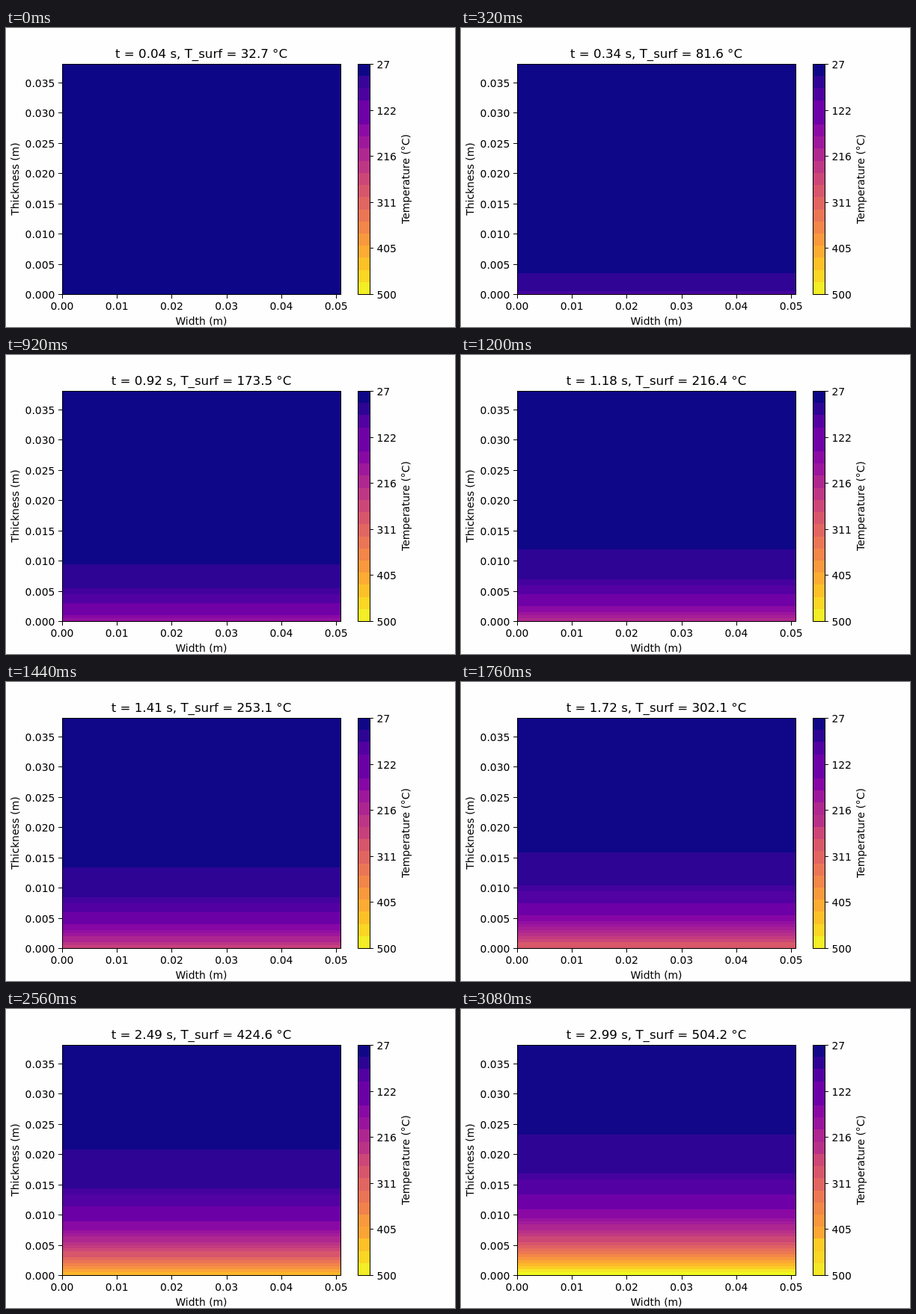
Animation, 600 px wide and 400 px high, one loop 3120 ms. Source, as an HTML page:

```html
<!DOCTYPE html>
<html>
<head>
<meta charset="utf-8">
<style>
  html, body { margin: 0; width: 100%; height: 100%; overflow: hidden; background: #fefefe; }
  svg { display: block; }
  text { font: 13.89px "DejaVu Sans", sans-serif; }
  #title { font-size: 16.67px; }
  rect, path { shape-rendering: crispEdges; }
  path { fill: none; stroke: #000; }
  .mid { text-anchor: middle; }
  .end { text-anchor: end; }
</style>
</head>
<body>
<svg id="stage" width="600" height="400" viewBox="0 0 600 400"></svg>
<script>
const FRAMES = 78, FRAME_MS = 40, STEPS = 13;
const ROWS = 77, BANDS = 19, T_MIN = 27, T_MAX = 500;
const DT = 0.002947, RISE = 0.47104, FOURIER = 0.4;
const LEFT = 75, TOP = 48, WIDTH = 372, HEIGHT = 308, BOTTOM = TOP + HEIGHT;
const BAR = 470, BAR_WIDTH = 16;

// Plasma colour map, one stop per 8 of 256 entries
const STOPS = ('0d0887 220690 310597 3f049c 4c02a1 5901a5 6600a7 7201a8 7e03a8 8a09a5 9511a1 ' +
  'a01a9c aa2395 b32c8e bc3587 c43e7f cc4778 d35171 da5a6a e06363 e66c5c eb7655 f0804e ' +
  'f58b47 f89540 fba139 fdac33 feb82c fdc527 fcd225 f8df25 f4ed27 effb20')
  .split(' ').map(hex => [0, 2, 4].map(k => parseInt(hex.slice(k, k + 2), 16)));

function plasma(fraction) {
  const i = Math.max(0, Math.min(255, Math.floor(fraction * 256)));
  const a = STOPS[i >> 3], b = STOPS[(i >> 3) + 1];
  return a.map((v, k) => Math.floor(v + (b[k] - v) * (i & 7) / 8));
}

// Merge colours that share a coarse RGB cell into their weighted mean
function reduceColors(samples) {
  const cells = {};
  const keyOf = ([r, g, b]) => [r >> 5, g >> 4, b >> 5].join();
  for (const { rgb, weight } of samples) {
    const cell = cells[keyOf(rgb)] ??= { sum: [0, 0, 0], weight: 0 };
    rgb.forEach((v, k) => cell.sum[k] += v * weight);
    cell.weight += weight;
  }
  return samples.map(({ rgb }) => {
    const { sum, weight } = cells[keyOf(rgb)];
    return `rgb(${sum.map(v => Math.floor(v / weight + 1e-6))})`;
  });
}

// Explicit 1D heat conduction with a linearly heated surface
function simulate() {
  const bar = Array.from({ length: BANDS }, (_, k) =>
    ({ rgb: plasma((k + 0.5) / BANDS), weight: BAR_WIDTH * HEIGHT / BANDS }));
  const frames = [];
  let temps = new Array(ROWS).fill(T_MIN);
  for (let step = 1; frames.length < FRAMES; step++) {
    temps = temps.map((v, i) => i
      ? v + FOURIER * (temps[i - 1] - 2 * v + (temps[i + 1] ?? v))
      : T_MIN + RISE * step);
    if (step % STEPS !== STEPS - 1) continue;
    const rows = temps.map(v =>
      ({ rgb: plasma((v - T_MIN) / (T_MAX - T_MIN)), weight: WIDTH * HEIGHT / ROWS }));
    frames.push({
      title: `t = ${(step * DT).toFixed(2)} s, T_surf = ${temps[0].toFixed(1)} °C`,
      colors: reduceColors([...rows, ...bar])
    });
  }
  return frames;
}

const stage = document.getElementById('stage');

function add(tag, attrs, content = '') {
  const el = document.createElementNS('http://www.w3.org/2000/svg', tag);
  for (const name in attrs) el.setAttribute(name, attrs[name]);
  el.textContent = content;
  return stage.appendChild(el);
}

const label = (x, y, content, cls = '') => add('text', { x, y, class: cls }, content);
const sideLabel = (x, content) =>
  add('text', { transform: `translate(${x} 202) rotate(-90)`, class: 'mid' }, content);

const fills = [];
const rowHeight = HEIGHT / ROWS;
for (let i = 0; i < ROWS; i++)
  fills.push(add('rect', { x: LEFT, y: BOTTOM - (i + 1) * rowHeight, width: WIDTH, height: rowHeight }));
for (let k = 0; k < BANDS; k++) {
  const edge = n => Math.round(TOP + n * HEIGHT / BANDS);
  fills.push(add('rect', { x: BAR, y: edge(k), width: BAR_WIDTH, height: edge(k + 1) - edge(k) }));
}

let lines = `M75.5 48.5H447.5V356.5H75.5ZM${BAR + 0.5} 48.5h16v308h-16Z`;
for (let k = 0; k < 6; k++) {
  const x = LEFT + k * 0.01 * WIDTH / 0.0508;
  lines += `M${Math.round(x) + 0.5} 357v5`;
  label(x, 377, (k * 0.01).toFixed(2), 'mid');

  const y = TOP + k * HEIGHT / 5;
  lines += `M487 ${Math.round(y) + 0.5}h4`;
  label(495.4, Math.round(y) + 5.5, Math.round(T_MIN + k * (T_MAX - T_MIN) / 5));
}
for (let k = 0; k < 8; k++) {
  const y = Math.round(BOTTOM - k * 0.005 * HEIGHT / 0.0381);
  lines += `M70 ${y + 0.5}h5`;
  label(65.3, y + 5.5, (k * 0.005).toFixed(3), 'end');
}
add('path', { d: lines });
label(261, 397, 'Width (m)', 'mid');
sideLabel(16.5, 'Thickness (m)');
sideLabel(538.5, 'Temperature (°C)');
const title = label(261, 40, '', 'mid');
title.id = 'title';

const frames = simulate();
let start, shown = -1;

function draw(now) {
  start ??= now;
  const index = Math.floor((now - start) / FRAME_MS) % FRAMES;
  if (index !== shown) {
    shown = index;
    title.textContent = frames[index].title;
    frames[index].colors.forEach((color, i) => fills[i].setAttribute('fill', color));
  }
  requestAnimationFrame(draw);
}
draw(performance.now());
</script>
</body>
</html>
```
